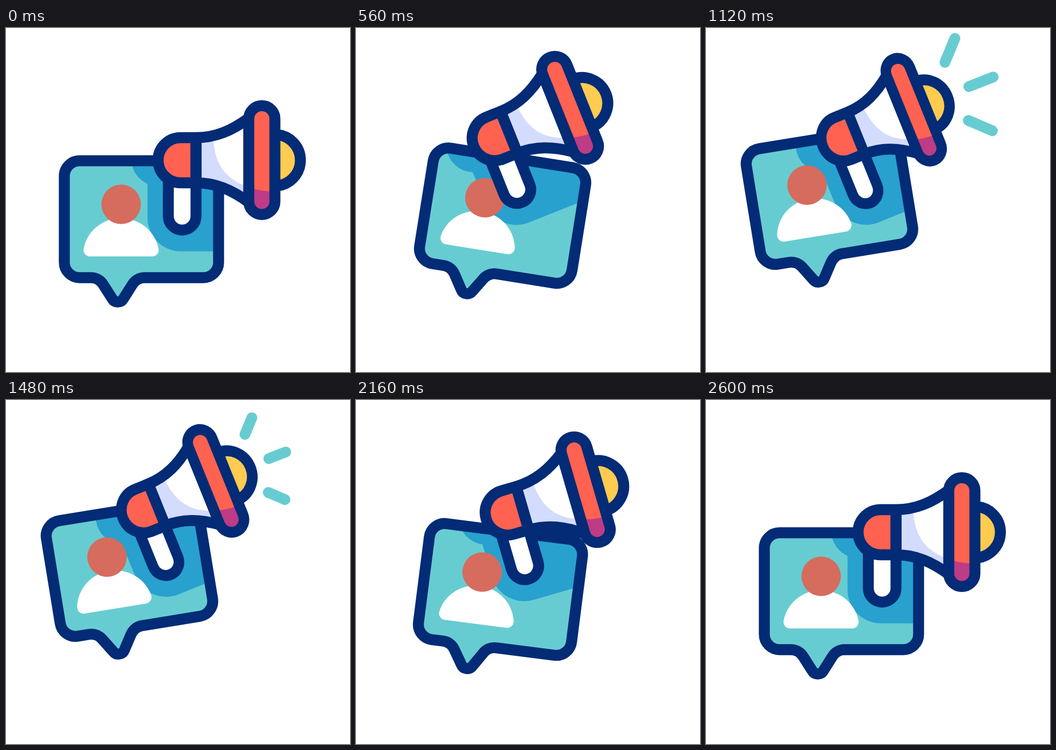
These frames come from a looping animation (640 by 640 pixels, 2.62 s). An HTML page:

```html
<!DOCTYPE html>
<html lang="en">
<head>
<meta charset="utf-8">
<title>Announcement</title>
<style>
  html, body { margin: 0; width: 100%; height: 100%; overflow: hidden; background: #fff; }
  svg { display: block; width: 100%; height: 100%; }
  .ink { fill: none; stroke: #032b76; stroke-width: 20.4; stroke-linecap: round; stroke-linejoin: round; }
  .ray { stroke: #67ccd1; stroke-width: 20; stroke-linecap: round; }
</style>
</head>
<body>
<svg viewBox="0 0 640 640">
  <defs>
    <path id="frame" d="M137 247H367a28.5 28.5 0 0 1 28.5 28.5V436a28.5 28.5 0 0 1-28.5 28.5H258
      c-9.5 0-18 4.800-23 13L218.500 503.500a12 12 0 0 1-21 0L181 477.500c-5-8.200-13.500-13-23-13H137
      a28.500 28.500 0 0 1-28.500-28.500V275.500A28.500 28.500 0 0 1 137 247z"/>
    <path id="horn" d="M353.500 204C390 204 420 191 452 167.500V324.500C420 301 390 288 353.500 288z"/>
    <path id="handle" d="M302 280V350.200a25.750 25.750 0 0 0 51.500 0V280"/>
    <path id="cap" d="M353.500 204H325a42 42 0 0 0 0 84H353.500z"/>
    <rect id="rim" x="451.700" y="144.500" width="48.600" height="202.500" rx="24.300"/>
    <clipPath id="inBubble"><use id="clipFrame" href="#frame"/></clipPath>
    <clipPath id="inHorn"><use href="#horn"/></clipPath>
    <clipPath id="inRim"><use href="#rim"/></clipPath>
  </defs>

  <use id="panel" href="#frame" fill="#67ccd1"/>
  <g clip-path="url(#inBubble)">
    <path id="shade" fill="#28a1cf" d="M284 191.500A51.500 51.500 0 0 0 263.300 290V353a62 62.500 0 0 0 62 62.500H760V60H284z"/>
  </g>
  <g id="bubble">
    <path fill="#fff" d="M156.500 425H272a12 12 0 0 0 11.800-14.500C277 377 248 354 214 354S151 377 144.500 410.500A12 12 0 0 0 156.500 425z"/>
    <circle cx="214.200" cy="328" r="36.700" fill="#d56c5e"/>
    <use href="#frame" class="ink"/>
  </g>

  <g id="phone">
    <use href="#handle" fill="#fff"/>
    <use href="#handle" class="ink"/>
    <circle cx="500" cy="246" r="47.700" fill="#ffcb50"/>
    <circle cx="500" cy="246" r="47.700" class="ink"/>
    <use href="#horn" fill="#fff"/>
    <path clip-path="url(#inHorn)" fill="#d3dcfd" d="M350 190H385C385 255 408 282 455 297V330H350z"/>
    <use href="#cap" fill="#ff6251"/>
    <use href="#horn" class="ink"/>
    <use href="#cap" class="ink"/>
    <use href="#rim" fill="#ff6251"/>
    <path clip-path="url(#inRim)" fill="#be3b85" d="M450 295C463 300.500 478 304 502 304V350H450z"/>
    <use href="#rim" class="ink"/>
  </g>
  <g id="rays"></g>
</svg>
<script>
const LOOP = 2620, END = 2600;
const RAYS = [[444.5, 64, 464.5, 16], [489, 109, 537.5, 90], [488, 172, 536, 192.5]];
const el = id => document.getElementById(id);
const set = (node, name, value) => node.setAttribute(name, value);
const mix = (a, b, k) => a + (b - a) * k;

// sine ease in and out between two times
function ease(t, from, to) {
  const k = Math.min(1, Math.max(0, (t - from) / (to - from)));
  return (1 - Math.cos(Math.PI * k)) / 2;
}

const lines = RAYS.map(() => {
  const line = document.createElementNS("http://www.w3.org/2000/svg", "line");
  set(line, "class", "ray");
  el("rays").appendChild(line);
  return line;
});

function drawBubble(t) {
  const turn = 9.5 * (ease(t, 0, 650) - ease(t, 1950, END))
    - 22.8 * (ease(t, 650, 1300) - ease(t, 1300, 1950));
  const lift = -38.7 * (ease(t, 0, 1300) - ease(t, 1300, END));
  const move = `translate(0 ${lift}) rotate(${turn} 208 491)`;
  for (const id of ["panel", "clipFrame", "bubble"]) set(el(id), "transform", move);
}

function drawPhone(t, phase) {
  const k = ease(t, 0, 600) - ease(t, 1930, END);
  const x = 325 - 68 * k * (0.44 + 0.56 * k);
  const y = 246 - 41.4 * k * (1.78 - 0.78 * k);
  const squash = 1 - 0.07 * (1 - Math.cos(2 * Math.PI * phase)) / 2;
  const move = `translate(${x} ${y}) rotate(${-22 * k}) translate(-325 -246)`;
  set(el("shade"), "transform", move);
  set(el("phone"), "transform", `${move} translate(273 0) scale(${squash} 1) translate(-273 0)`);
}

function drawRays(phase) {
  const head = ease(phase, 0, 0.42), tail = ease(phase, 0.35, 0.85);
  RAYS.forEach(([x0, y0, x1, y1], i) => {
    const line = lines[i];
    set(line, "x1", mix(x0, x1, tail));
    set(line, "y1", mix(y0, y1, tail));
    set(line, "x2", mix(x0, x1, head));
    set(line, "y2", mix(y0, y1, head));
    set(line, "visibility", head - tail > 0.01 ? "visible" : "hidden");
  });
}

function draw(now) {
  const t = Math.min(now % LOOP, END);
  // three shouts of 400 ms each
  const phase = t > 580 && t < 1780 ? ((t - 580) % 400) / 400 : 0;
  drawBubble(t);
  drawPhone(t, phase);
  drawRays(phase);
}

let start;
function tick(now) {
  if (start === undefined) start = now;
  draw(now - start);
  requestAnimationFrame(tick);
}
draw(0);
requestAnimationFrame(tick);
</script>
</body>
</html>
```
